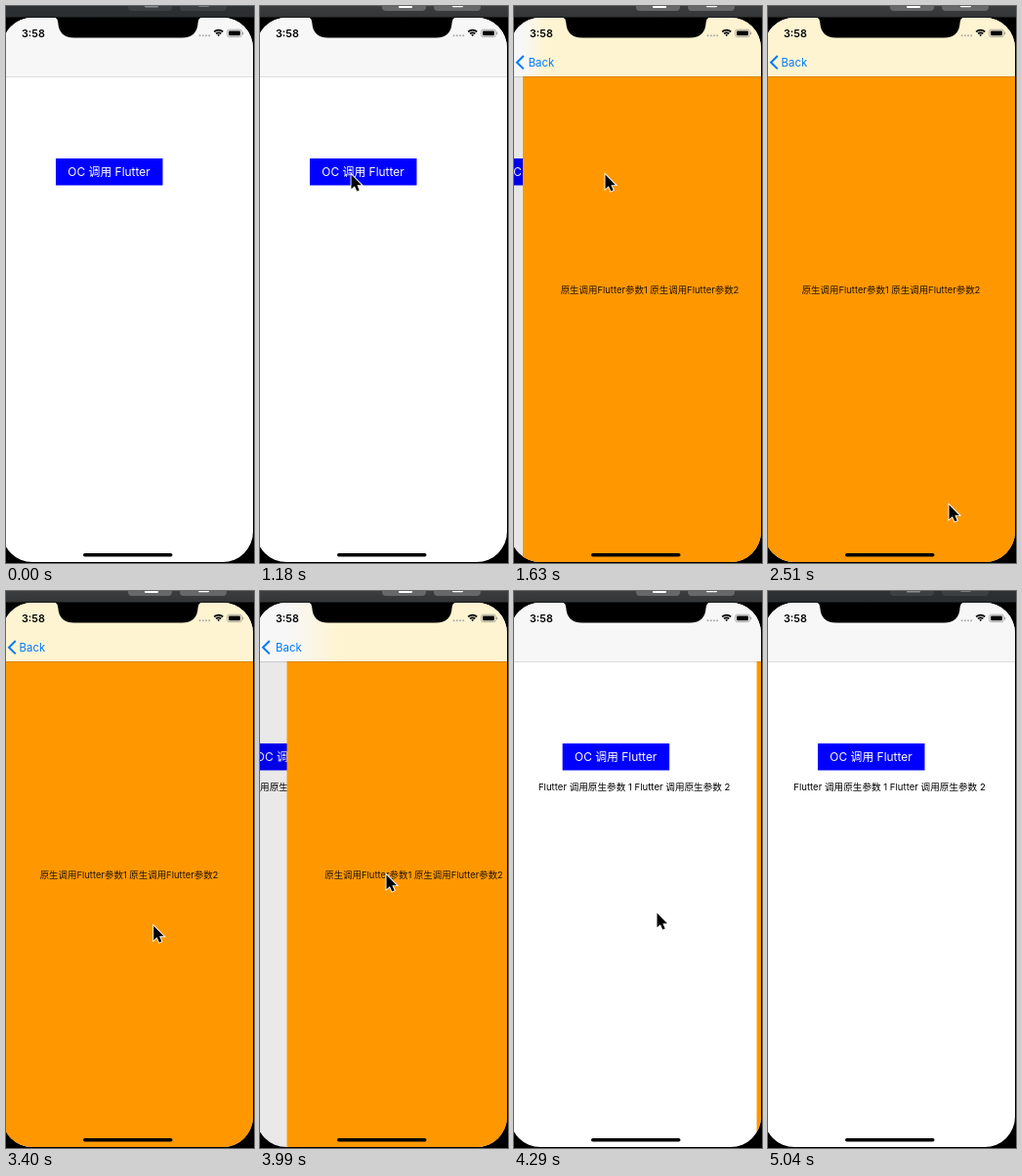
Recreate the animation shown at these times as an HTML page with a canvas. Size 254 by 570 pixels, loop 5140 ms.

```html
<!DOCTYPE html>
<html lang="zh">
<head>
<meta charset="utf-8">
<title>Page push and pop</title>
<style>
  html, body { margin: 0; width: 100%; height: 100%; overflow: hidden; background: #000; }
  canvas { display: block; }
</style>
</head>
<body>
<canvas id="stage" width="254" height="570"></canvas>
<script>
const ctx = document.getElementById('stage').getContext('2d');
const LOOP = 5140, STEP = 148, STEP_SHIFT = 6;
const LEFT = -4, WIDTH = 257, PARALLAX = 77;
const PUSH_AT = 1363, POP_AT = 3957;
const FONT = 'Inter, "Noto Sans CJK SC", "Noto Sans CJK", sans-serif';

// Pointer keys: step, x, y
const POINTER = [
  [5, 190, 420], [8, 93, 172], [12, 93, 172], [17, 185, 510], [19, 207, 554],
  [25, 131, 268], [26, 130, 289], [27, 129, 290], [28, 132, 297], [29, 146, 329], [32, 200, 540]
];

const clamp = v => Math.max(0, Math.min(1, v));

// Critically damped spring: distance left, from 1 to 0
function spring(ms) {
  const wt = 18.26 * Math.max(0, ms) / 1000;
  return (1 + wt) * Math.exp(-wt);
}

function rect(x, y, w, h, color) {
  ctx.fillStyle = color;
  ctx.fillRect(x, y, w, h);
}

function round(x, y, w, h, r, color) {
  ctx.fillStyle = color;
  ctx.beginPath();
  ctx.roundRect(x, y, w, h, r);
  ctx.fill();
}

function text(str, x, y, size, color, align = 'center', weight = 400) {
  ctx.font = `${weight} ${size}px ${FONT}`;
  ctx.textAlign = align;
  ctx.fillStyle = color;
  ctx.fillText(str, x, y);
}

function drawToolbar(active) {
  const shade = ctx.createLinearGradient(0, 0, 0, 12);
  shade.addColorStop(0, active ? '#3b3d3f' : '#2d3134');
  shade.addColorStop(1, active ? '#323436' : '#292d2f');
  rect(0, 0, 254, 11.5, shade);
  const button = active ? '#66686a' : '#3c4043';
  const icon = active ? '#fff' : '#8b8e90';
  round(125, -8, 45, 13, 4, button);
  round(178, -8, 48, 13, 4, button);
  round(142, -4, 14, active ? 6 : 5.5, 1, icon);
  round(197, -4, 11, active ? 5.2 : 4.8, 1, icon);
}

function drawHome(shift, dim, showResult) {
  rect(LEFT, 12, WIDTH, 558, '#fff');
  ctx.save();
  ctx.translate(shift, 0);
  rect(51, 156, 109.5, 27.5, '#00f');
  text('OC 调用 Flutter', 105.5, 174.2, 11.9, '#fff');
  if (showResult) text('Flutter 调用原生参数 1 Flutter 调用原生参数 2', 124.5, 204.2, 9.6, '#000');
  ctx.restore();
  rect(LEFT, 12, WIDTH, 558, `rgba(0,0,0,${dim})`);
}

function drawDetail(edge) {
  rect(edge, 72, WIDTH, 498, '#ff9800');
  text('原生调用Flutter参数1 原生调用Flutter参数2', edge + 130, 294.2, 9.45, 'rgba(0,0,0,.87)');
}

function drawNavBar(edge, cover) {
  const tint = ctx.createLinearGradient(edge, 0, edge + 1 + Math.min(55, (edge - LEFT) * 1.7), 0);
  tint.addColorStop(0, '#f7f7f7');
  tint.addColorStop(1, '#fff4d1');
  rect(LEFT, 12, WIDTH, 60, tint);
  rect(LEFT, 72, WIDTH, 0.7, 'rgba(0,0,0,.2)');

  ctx.globalAlpha = clamp(cover * 2 - 0.7);
  ctx.strokeStyle = '#007aff';
  ctx.lineWidth = 2;
  ctx.beginPath();
  ctx.moveTo(9.8, 51);
  ctx.lineTo(3, 57.7);
  ctx.lineTo(9.8, 64.4);
  ctx.stroke();
  text('Back', 13.6 + (edge - LEFT) * 0.08, 61.7, 11.4, '#007aff', 'left');
  ctx.globalAlpha = 1;
}

function drawStatus() {
  text('3:58', 16, 31.7, 10.8, '#000', 'left', 600);
  for (let i = 0; i < 4; i++) round(197.6 + i * 3.2, 29.2, 2, 2, 1, '#aaa');

  ctx.strokeStyle = '#000';
  ctx.lineWidth = 1.7;
  for (const r of [1, 3.7, 6.4]) {
    ctx.beginPath();
    ctx.arc(217.7, 31, r, -Math.PI * 0.75, -Math.PI * 0.25);
    ctx.stroke();
  }

  ctx.strokeStyle = '#999';
  ctx.lineWidth = 0.8;
  ctx.beginPath();
  ctx.roundRect(226.6, 24.2, 14.8, 7.4, 2);
  ctx.stroke();
  round(228, 25.5, 12, 4.8, 1, '#000');
  round(242.2, 26.6, 1, 2.6, 0.5, '#999');
}

function drawNotch() {
  ctx.fillStyle = '#000';
  ctx.fill(new Path2D('M49 11.5 Q53 12 53.3 17 C54 27 59 32.6 70 32.6 H180 C191 32.6 196 27 196.6 17 Q197 12 201 11.5 Z'));
}

function drawPointer(step) {
  const next = POINTER.findIndex(key => key[0] >= step);
  let [, x, y] = POINTER.at(next);
  if (next > 0) {
    const [s0, x0, y0] = POINTER[next - 1];
    const u = (step - s0) / (POINTER[next][0] - s0);
    const e = u * u * (3 - 2 * u);
    x = x0 + (x - x0) * e;
    y = y0 + (y - y0) * e;
  }
  ctx.save();
  ctx.translate(x + 0.5, y + 0.5);
  const arrow = new Path2D('M0 0 V14.8 L3.4 11.7 L5.8 17 L8.2 15.9 L5.9 10.7 H10.5 Z');
  ctx.strokeStyle = '#fff';
  ctx.lineWidth = 1.8;
  ctx.stroke(arrow);
  ctx.fillStyle = '#000';
  ctx.fill(arrow);
  ctx.restore();
}

function draw(ms) {
  const step = Math.floor((ms + STEP_SHIFT) / STEP);
  const t = step * STEP - STEP_SHIFT;
  const cover = t < PUSH_AT ? 0 : t < POP_AT ? 1 - spring(t - PUSH_AT) : spring(t - POP_AT);
  const edge = LEFT + WIDTH * (1 - cover);

  rect(0, 0, 254, 570, '#000');
  drawToolbar(step >= 7 && step < 34);

  ctx.save();
  ctx.beginPath();
  ctx.roundRect(LEFT, 12, WIDTH, 557, 31);
  ctx.clip();
  drawHome(-PARALLAX * cover, 0.1 * cover, step >= 26);
  drawDetail(edge);
  drawNavBar(edge, cover);
  drawStatus();
  drawNotch();
  round(79, 560, 91.5, 3.5, 1.75, '#000');
  ctx.restore();

  if (step >= 5 && step < 34) drawPointer(step);
}

const start = performance.now();
function tick() {
  draw((performance.now() - start) % LOOP);
  requestAnimationFrame(tick);
}
tick();
</script>
</body>
</html>
```
